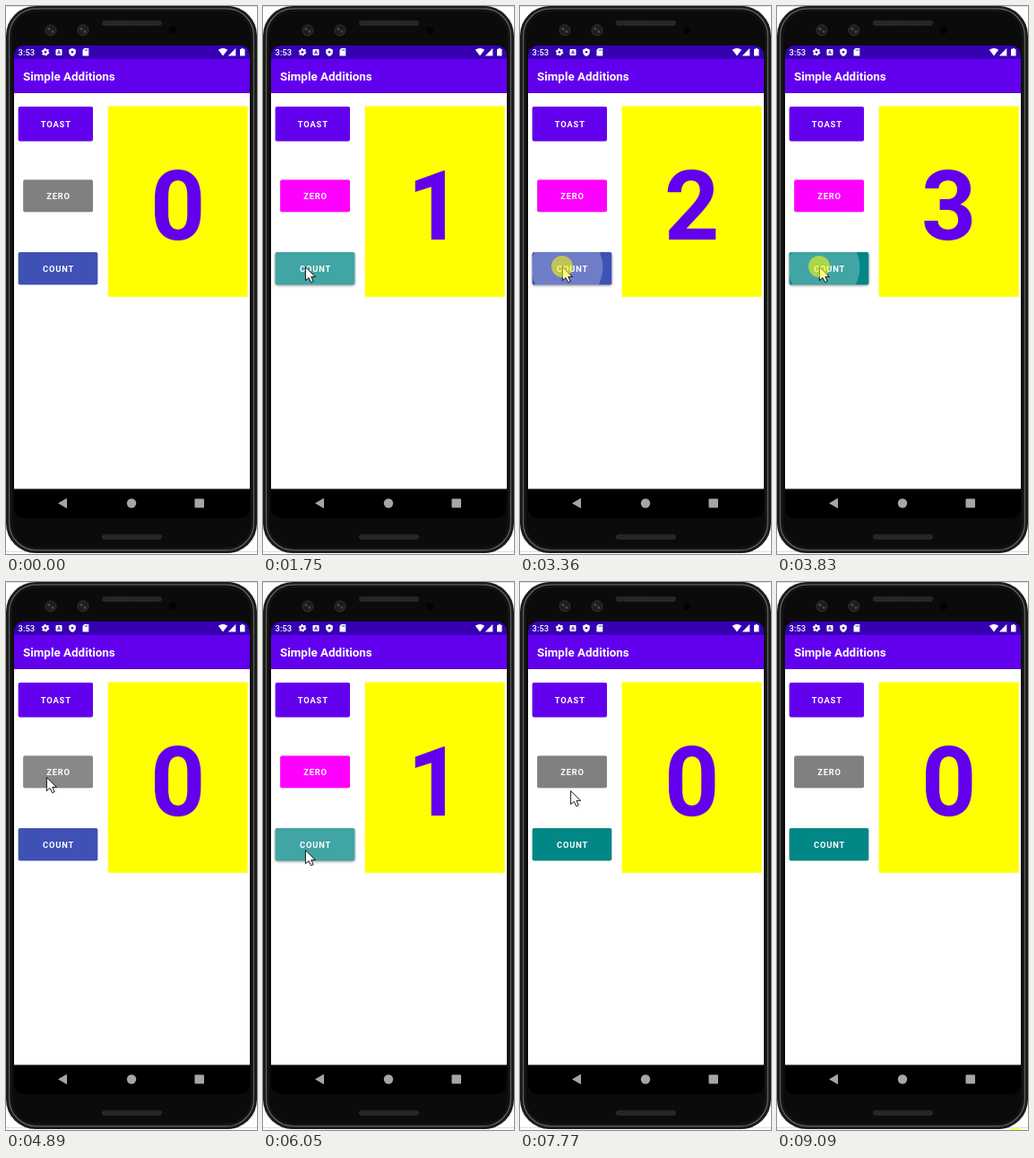
These frames come from a looping animation (280x610 px, 9240 ms). An HTML page:

```html
<!DOCTYPE html>
<html lang="en">
<head>
<meta charset="utf-8">
<title>Counter app</title>
<style>
  html, body { margin: 0; width: 100%; height: 100%; overflow: hidden; background: #fff; }
  svg { display: block; font-family: Roboto, sans-serif; font-weight: 700; }
  .label { font-size: 9.37px; letter-spacing: .8px; text-anchor: middle; fill: #fff; }
  .button { filter: drop-shadow(0 .6px .6px rgba(0, 0, 0, .25)); }
  .button.raised { filter: drop-shadow(0 1.6px 1.8px rgba(0, 0, 0, .42)); }
  #value { font-size: 107px; text-anchor: middle; fill: #6200ee; }
</style>
</head>
<body>
<svg width="280" height="610" viewBox="0 0 280 610">
  <defs>
    <pattern id="mesh" width="3" height="3" patternUnits="userSpaceOnUse">
      <rect width="3" height="3" fill="#1c1c1c"/>
      <path d="M0 0L3 3M3 0L0 3" stroke="#353535" stroke-width=".7"/>
    </pattern>
    <clipPath id="countClip"><rect x="13.7" y="274" width="88.6" height="36.3" rx="2"/></clipPath>
    <clipPath id="zeroClip"><rect x="19.2" y="193.5" width="77.8" height="35.7" rx="2"/></clipPath>
  </defs>

  <!-- phone body -->
  <path d="M0 .5H280M0 607.5H280" stroke="#d9d9f5"/>
  <rect width="280" height="609" rx="33" fill="#1c1c1c"/>
  <rect x="3.7" y="3.2" width="272.6" height="602.4" rx="30" fill="#080808" stroke="#626262" stroke-width="1.3"/>
  <rect x="6" y="5.5" width="268" height="598" rx="28" fill="#0b0b0b" stroke="#1d1d1d"/>
  <rect x="107" y="16" width="67" height="6" rx="3" fill="url(#mesh)"/>
  <rect x="107" y="588" width="67" height="6" rx="3" fill="url(#mesh)"/>
  <g fill="#1d1d1d" stroke="#333">
    <circle cx="50" cy="27" r="6"/><circle cx="86" cy="27" r="6"/>
  </g>
  <g fill="#484848">
    <circle cx="48" cy="25.5" r="1.6"/><circle cx="52" cy="28.5" r="1.4"/>
    <circle cx="84" cy="25.5" r="1.6"/><circle cx="88" cy="28.5" r="1.4"/>
  </g>
  <circle cx="186" cy="27" r="4" fill="#030303"/>

  <!-- screen -->
  <rect x="9" y="44" width="263" height="526" rx="11" fill="#000"/>
  <path d="M9 96.7H272V537.6H9z" fill="#fff"/>
  <path d="M9 59H272V96.7H9z" fill="#6200ee"/>
  <path d="M9 59V55A11 11 0 0 1 20 44H261A11 11 0 0 1 272 55V59z" fill="#3700b3"/>

  <g fill="#fff">
    <text x="13.6" y="54.8" font-size="9.4" font-weight="500">3:53</text>
    <text x="19" y="83.4" font-size="13.4">Simple Additions</text>
    <circle cx="44" cy="51.3" r="2.4" fill="none" stroke="#fff" stroke-width="2"/>
    <circle cx="44" cy="51.3" r="3.7" fill="none" stroke="#fff" stroke-width="1.2" stroke-dasharray="1.9 1.97"/>
    <rect x="55.5" y="48" width="7" height="7" rx="1"/>
    <path d="M70.2 48.4L74 46.9L77.8 48.4V51.4Q77.5 54.5 74 56Q70.5 54.5 70.2 51.4z"/>
    <path d="M87.3 47H92.3V55.5H85.5V49z"/>
    <path d="M236.8 48.8Q242 45 247.2 48.8L242 55.5z"/>
    <path d="M256.3 47V55.5H247.8z"/>
    <path d="M261 48H262.6V47H265V48H266.5V55.5H261z"/>
  </g>
  <path d="M57.3 53.5L59 49.5L60.7 53.5M58 52.3H60" fill="none" stroke="#3700b3" stroke-width=".8"/>
  <circle cx="74" cy="51.3" r="1.3" fill="#3700b3"/>
  <path d="M88 48.2V50M89.6 48.2V50M91 48.2V50" stroke="#3700b3" stroke-width=".6"/>

  <g fill="#a6a6a6">
    <path d="M58 553.5L68 547.8V559.2z"/>
    <circle cx="140" cy="553.5" r="5.2"/>
    <rect x="210.5" y="548.5" width="10.5" height="10" rx=".8"/>
  </g>

  <!-- app -->
  <path d="M113.7 111.4H269.6V323.7H113.7z" fill="#ff0"/>
  <text id="value" x="191.8" y="260">0</text>

  <g class="button"><rect x="13.7" y="112" width="83.3" height="38.5" rx="2" fill="#6200ee"/></g>
  <g class="button" id="zero">
    <rect x="19.2" y="193.5" width="77.8" height="35.7" rx="2"/>
    <g clip-path="url(#zeroClip)"><circle class="ripple" fill="#fff"/></g>
  </g>
  <g class="button" id="count">
    <rect x="13.7" y="274" width="88.6" height="36.3" rx="2"/>
    <g clip-path="url(#countClip)"><circle class="ripple" fill="#fff"/></g>
  </g>
  <g class="label">
    <text x="55.8" y="135">TOAST</text>
    <text x="58.6" y="214.8">ZERO</text>
    <text x="58.6" y="295.8">COUNT</text>
  </g>

  <path id="cursor" d="M.4 .6V15.6L4 12.4L6.6 17.7L9.2 16.5L6.8 11.4H11.4z" fill="#fff" stroke="#000" stroke-width=".9"/>
  <circle id="press" r="12" fill="#ff0" fill-opacity=".55"/>
</svg>

<script>
const LOOP = 9240, TICK = 76.5;
const $ = id => document.getElementById(id);
const mix = (a, b, p) => a + (b - a) * p;

// start, time of last step, steps, x, y
const moves = [
  [440, 1050, 9, 35, 285],
  [1200, 1280, 2, 47, 290],
  [4050, 4200, 3, 42, 235],
  [4280, 4360, 2, 45, 217],
  [5350, 5510, 3, 47, 296],
  [5870, 5950, 2, 47, 298],
  [6670, 6990, 5, 52, 221],
  [7770, 8460, 10, 203, 612]
];

// start, button, steps
const clicks = [
  [1510, 'count', 7], [2680, 'count', 6], [3290, 'count', 6], [3760, 'count', 7],
  [4510, 'zero', 6], [5790, 'count', 7], [7140, 'zero', 7]
];

const buttons = { zero: { x: 58, y: 211.5 }, count: { x: 58, y: 292 } };
const rippleRadius = [20, 40, 52];
const rippleAlpha = [.25, .25, .25, .25, .16, .06, 0];
const RELEASE = 2;

function cursorAt(t) {
  let x = 284, y = 614;
  for (const [start, last, steps, toX, toY] of moves) {
    if (t < start) break;
    const step = Math.floor((t - start) / ((last - start) / (steps - 1)) + .001) + 1;
    const p = Math.min(1, step / steps);
    const eased = start === 440 ? 1 - (1 - p) ** 2 : p * p * (3 - 2 * p);
    x = mix(x, toX, eased);
    y = mix(y, toY, eased);
  }
  return { x, y };
}

function appAt(t) {
  const app = { value: 0, teal: false, target: null, step: 0 };
  for (const [start, target, steps] of clicks) {
    if (t < start) break;
    app.target = target;
    app.step = Math.min(steps - 1, Math.floor((t - start) / TICK + .1));
    if (app.step < RELEASE) continue;
    app.value = target === 'count' ? app.value + 1 : 0;
    if (target === 'count') app.teal = app.value % 2 === 1;
  }
  return app;
}

function place(circle, x, y, r) {
  circle.setAttribute('cx', x);
  circle.setAttribute('cy', y);
  circle.setAttribute('r', r);
}

function draw(t) {
  const cursor = cursorAt(t), app = appAt(t);
  $('value').textContent = app.value;
  $('zero').setAttribute('fill', app.value ? '#f0f' : '#808080');
  $('count').setAttribute('fill', app.teal ? '#018786' : '#3f51b5');

  for (const id in buttons) {
    const active = id === app.target, { x, y } = buttons[id];
    const ripple = $(id).querySelector('.ripple');
    const drift = Math.min(1, (app.step + 1) * .25);
    $(id).classList.toggle('raised', active && app.step < 4);
    place(ripple, mix(cursor.x, x, drift), mix(cursor.y, y, drift), rippleRadius[app.step] || 90);
    ripple.setAttribute('opacity', active ? rippleAlpha[app.step] : 0);
  }

  $('cursor').setAttribute('transform', `translate(${cursor.x} ${cursor.y})`);
  const parting = t >= 9090;
  const pressed = app.target && app.step < RELEASE;
  place($('press'), parting ? 266 : cursor.x, parting ? 619 : cursor.y, 12);
  $('press').setAttribute('visibility', parting || pressed ? 'visible' : 'hidden');
}

const origin = performance.now();
function frame() {
  draw((performance.now() - origin) % LOOP);
  requestAnimationFrame(frame);
}
frame();
</script>
</body>
</html>
```
